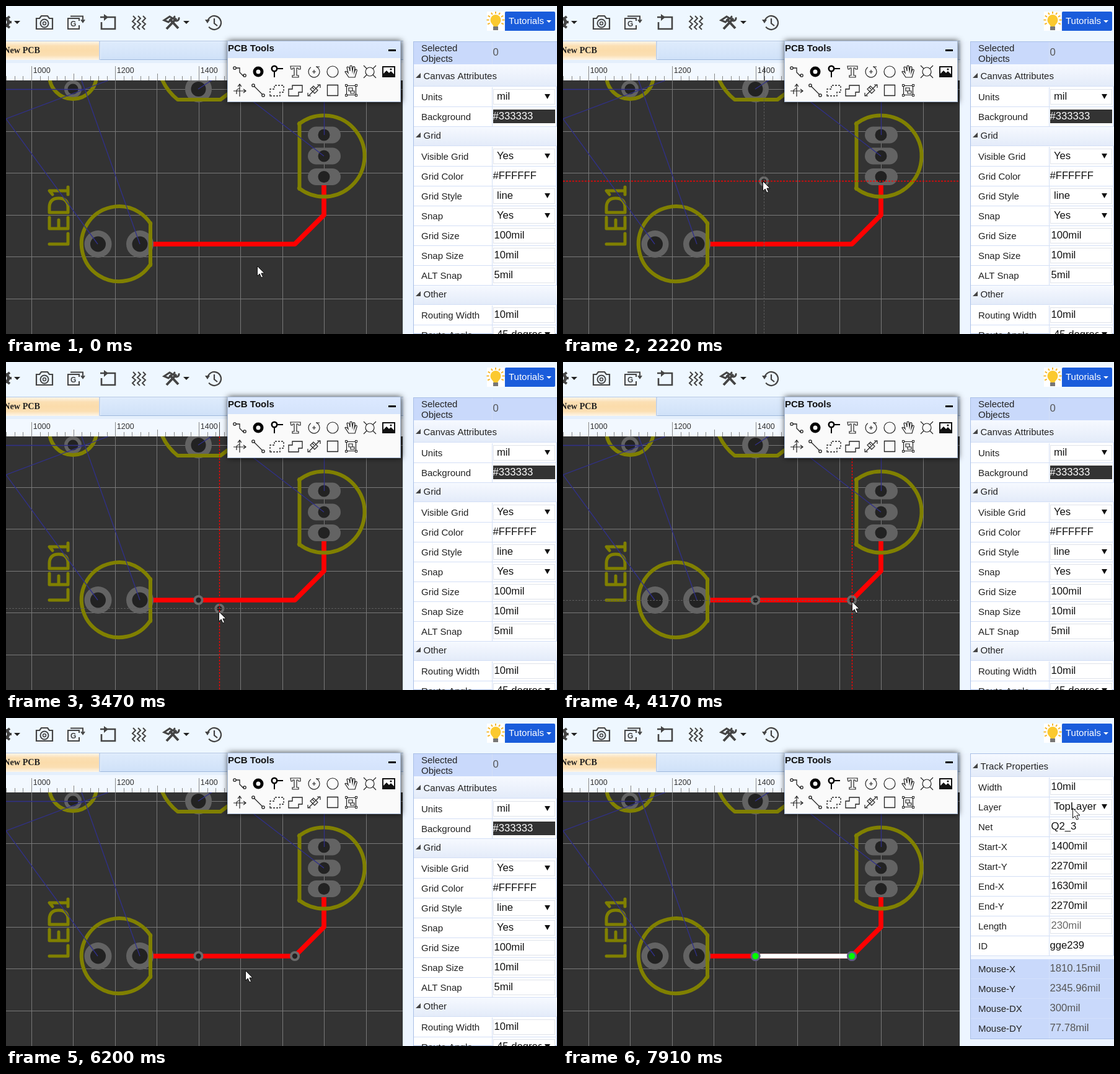
Recreate the animation shown at these times as an HTML page with a canvas. Size 889 px wide and 529 px high, loop 7.99 s.

```html
<!DOCTYPE html>
<html lang="en">
<head>
<meta charset="utf-8">
<title>PCB editor</title>
<style>
html, body { margin: 0; width: 100%; height: 100%; overflow: hidden; background: #eef7ff; }
canvas { display: block; }
</style>
</head>
<body>
<canvas id="stage" width="889" height="529"></canvas>
<script>
const ctx = document.getElementById('stage').getContext('2d');
const LOOP = 7990, SCALE = 0.676, STEP = 10 * SCALE;
const SANS = '"Liberation Sans", Arial, sans-serif';
const SERIF = '"Liberation Serif", "Times New Roman", serif';
const OLIVE = '#808000', PAD = '#636363', HOLE = '#222', INK = '#444';
const TRACK = 7.7, VALUE = 16.67;

// pointer keyframes: time, x, y
const KEYS = [
  [0, 405, 419], [821, 405, 419], [1050, 412, 340], [1290, 432, 170], [1530, 437, 100],
  [1987, 437, 100], [2218, 322, 282], [2450, 306, 350], [2680, 308, 384],
  [3151, 308, 384], [3467, 343, 402], [3740, 400, 394], [4020, 459, 386],
  [4050, 459, 386], [4170, 466, 386], [5555, 466, 386], [5810, 384, 452],
  [5962, 384, 452], [6195, 386, 407], [6350, 387, 384], [6982, 387, 384],
  [7137, 470, 372], [7293, 589.8, 331.4], [7527, 740, 230], [7760, 820, 150],
  [7909, 820, 150], [7910, 822, 145], [LOOP, 822, 145]
];
// stepped moves: start, end, number of steps
const MOVES = [[900, 1530, 9], [1910, 2680, 11], [3230, 4020, 11], [4110, 4170, 2],
  [5640, 5810, 3], [6040, 6350, 5], [7060, 7760, 10], [7910, 7911, 2]];
// click highlights: start, end, x, y
const CLICKS = [[520, 900, 405.5, 419.5], [1910, 1987, 437, 99.5], [3090, 3230, 308.5, 384.5],
  [4630, 5410, 466.5, 386.5], [6670, 7060, 387, 384]];

function pointer(t) {
  let held = 0;
  for (const [a, b, n] of MOVES) {
    if (t < a) break;
    const d = (b - a) / (n - 1);
    held = a + Math.min(n - 1, Math.floor((t - a) / d + 1e-6)) * d;
  }
  const i = Math.max(1, KEYS.findIndex(k => k[0] >= held));
  const [t0, x0, y0] = KEYS[i - 1], [t1, x1, y1] = KEYS[i];
  const f = (held - t0) / (t1 - t0);
  return { x: x0 + (x1 - x0) * f, y: y0 + (y1 - y0) * f };
}

function rect(x, y, w, h, fill, line) {
  if (fill) { ctx.fillStyle = fill; ctx.fillRect(x, y, w, h); }
  if (line) { ctx.strokeStyle = line; ctx.lineWidth = 1; ctx.strokeRect(x + .5, y + .5, w - 1, h - 1); }
}
function stroke(d, color, w = 1, dash = []) {
  ctx.strokeStyle = color;
  ctx.lineWidth = w;
  ctx.setLineDash(dash);
  ctx.stroke(new Path2D(d));
  ctx.setLineDash([]);
}
function fill(d, color) { ctx.fillStyle = color; ctx.fill(new Path2D(d)); }
function disc(x, y, r, color) {
  ctx.fillStyle = color;
  ctx.beginPath(); ctx.arc(x, y, r, 0, 7); ctx.fill();
}
function ring(x, y, r, color, w, a = 0, b = Math.PI * 2) {
  ctx.strokeStyle = color; ctx.lineWidth = w;
  ctx.beginPath(); ctx.arc(x, y, r, a, b); ctx.stroke();
}
function text(s, x, y, size, color = '#111', font = SANS, weight = '', align = 'left') {
  ctx.font = `${weight} ${size}px ${font}`;
  ctx.fillStyle = color;
  ctx.textAlign = align;
  ctx.fillText(s, x, y);
}
function shade(x, y, w, h, ...colors) {
  const g = ctx.createLinearGradient(0, y, 0, y + h);
  colors.forEach((c, i) => g.addColorStop(i / (colors.length - 1), c));
  rect(x, y, w, h, g);
}
function caret(x, y, color, r = 5) { fill(`M${x - r} ${y}h${2 * r}l${-r} ${r}z`, color); }

function toolbar() {
  rect(0, 0, 889, 529, '#eef7ff');
  ring(-2, 26, 6, INK, 5);
  stroke('M2 20l4-3M4 26h5M2 32l4 3', INK, 4);
  caret(18, 24, '#222');
  stroke('M49 20h5l3-4h10l3 4h5v17h-26z', INK, 2.2);
  ring(62, 28, 6.5, INK, 2);
  ring(62, 28, 2.5, INK, 1.5);
  stroke('M118 31v6h-18v-17h18v4M104 16.5h20v9M121 22l3 4 3-4', INK, 2);
  text('G', 104, 33, 12, INK, SANS, 'bold');
  stroke('M154 26v11h22v-19h-24', INK, 2.6);
  fill('M158 13l7 5-7 6z', INK);
  for (let i = 0; i < 3; i++)
    stroke(`M${205 + i * 8} 16l4 4-5 5 5 4-5 5 4 4`, INK, 2);
  stroke('M259 37l16-17M264 21l14 15', INK, 4);
  stroke('M255 23l9-6 5 3-7 6z', INK, 3);
  ring(275, 20, 4, INK, 3, -.4, 4.2);
  caret(291, 24, '#222');
  ring(336, 27, 11, INK, 2.2, -2.9, 2.5);
  stroke('M336 20v8l5 4', INK, 2.2);
  fill('M321 22h8l-4 6z', INK);

  rect(776, 9, 28, 31, '#fff');
  for (let i = 0; i < 9; i++) {
    const a = Math.PI * (.85 + i * .1625), c = Math.cos(a), s = Math.sin(a);
    stroke(`M${790 + c * 10.5} ${23 + s * 10.5}L${790 + c * 14.5} ${23 + s * 14}`, '#f5b82e', 2);
  }
  disc(790, 22.5, 8.5, '#fbc92f');
  fill('M783 27h14l-4 6h-6z', '#fbc92f');
  rect(786, 33, 8, 6, '#777');
  fill('M807 9h77q2 0 2 2v27q0 2-2 2h-79v-29q0-2 2-2z', '#1a5cdb');
  text('Tutorials', 811, 29, 15, '#fff');
  caret(876, 23, '#fff', 4);

  rect(0, 56, 641, 36, '#e4effc');
  shade(0, 57, 151, 30, '#fef6e8', '#fbdfb3', '#fbdcab', '#fbdfb3', '#fef6e8');
  rect(150, 57, 2, 30, '#c3d4ec');
  shade(153, 58, 488, 29, '#deebfc', '#cfe1f8');
  rect(0, 56, 641, 1, '#b4c8e4');
  rect(152, 86, 489, 1, '#9fb9dd');
  text('New PCB', 55, 76, 14.2, '#222', SERIF, 'bold', 'right');
}

function ruler(mark) {
  rect(0, 92, 641, 28, '#f2f8ff');
  for (let i = -3; i < 45; i++) {
    const x = Math.round(41 + i * 2 * STEP), major = i % 10 === 0;
    rect(x, major ? 97 : i % 5 === 0 ? 109 : 113, 1, 30, '#888');
    if (major && i >= 0) text(1000 + i * 20, x + 2.8, 108, 12.5, '#333');
  }
  if (mark) rect(Math.floor(mark), 97, 1, 23, '#444');
}

function via(x, y) {
  disc(x, y, 8, '#6a6a6a');
  disc(x, y, 4.2, HOLE);
}
function padRound(x, y, r, hole) {
  disc(x, y, r, PAD);
  disc(x, y, hole, HOLE);
}

function board(t, p) {
  const placing = t >= 1987 && t < 5410 && p.y > 120;
  const snap = (v, o) => o + Math.round((v - o) / STEP) * STEP;
  const vx = snap(p.x, 40.2), vy = snap(p.y - 1, 134);

  ruler(placing && vx);
  ctx.save();
  ctx.beginPath(); ctx.rect(0, 120, 640, 409); ctx.clip();
  rect(0, 120, 640, 409, '#333');
  for (let i = 0; i < 9; i++) {
    rect(Math.floor(41 + i * 67.55), 120, 1, 409, '#787878');
    if (i < 6) rect(0, Math.floor(134.5 + i * 67.55), 640, 1, '#787878');
  }

  ctx.lineCap = ctx.lineJoin = 'round';
  stroke('M513 276V337L466 384H216', '#f00', TRACK);
  if (t >= 6350) stroke('M311 384H465', '#fff', TRACK);

  padRound(148.5, 384, 22, 12.5);
  padRound(216, 384, 22, 12.5);
  padRound(108, 134, 14, 8.5);
  padRound(310.5, 134, 21.5, 12);
  for (const y of [208, 242, 275.5]) {
    stroke(`M500.5 ${y}H526.5`, PAD, 27);
    disc(513, y, 9.5, HOLE);
  }

  // component outlines lie above the pads
  ring(182.3, 383.7, 60.5, OLIVE, 6, .57, Math.PI * 2 - .57);
  stroke('M233 350V418', OLIVE, 6);
  ring(513, 242, 65.5, OLIVE, 6, -2.23, 2.23);
  stroke('M473.5 189V295', OLIVE, 6);
  ring(108, 112, 38, OLIVE, 6);
  stroke('M249 112Q258 136 277 151H346L362 139', OLIVE, 6);
  ctx.save();
  ctx.translate(103, 387);
  ctx.rotate(-Math.PI / 2);
  stroke('M3-33V-3H20M46-33H28V-3H46M28-18H42M54-33V-3H62Q77-3 77-18Q77-33 62-33ZM83-28L89-33V-3M83-3H95', OLIVE, 5);
  ctx.restore();

  ctx.lineCap = 'butt';
  stroke('M0 134.5H127M0 182L165 120M0 182L148 384M122 120L216 384M310 134L350 108M357 122L513 242M513.5 120V208', '#30308a', 1.3);

  if (t >= 3090) via(310.5, 384);
  if (t >= 4630) via(466, 384);
  if (placing) {
    via(vx, vy);
    const x = Math.floor(vx) + .5, y = Math.floor(vy) + .5;
    const flat = t < 3090;
    stroke(`M0 ${y}H640`, flat ? '#f00' : '#5c5c5c', flat ? 1.3 : 1, [3, 2]);
    stroke(`M${x} 120V529`, flat ? '#5c5c5c' : '#f00', flat ? 1 : 1.3, [3, 2]);
  }
  if (t >= 6670) for (const x of [310.5, 466]) {
    disc(x, 384, 8, '#5e5e84');
    disc(x, 384, 5.2, '#0f0');
  }
  ctx.restore();
  rect(640, 120, 1, 409, '#d5e2f2');
}

function palette(p) {
  ctx.save();
  ctx.shadowColor = 'rgba(0,0,0,.75)';
  ctx.shadowBlur = 9;
  ctx.shadowOffsetX = 1;
  rect(357, 56, 280, 99, '#fafafa');
  ctx.restore();
  shade(357, 57, 280, 28, '#dce9ff', '#d4e3fb');
  rect(357, 84, 280, 71, '#fafafa');
  rect(357, 56, 280, 99, null, '#a9bcd8');
  text('PCB Tools', 358, 73, 15, '#111', SANS, 'bold');
  rect(617, 70, 12, 3, '#000');

  if (Math.abs(p.x - 437) < 16 && p.y > 89 && p.y < 122) rect(422, 90, 30, 31, '#dfebff', '#a9c6f5');

  const k = '#222';
  stroke('M371 100h6v7l5 5h2', k, 1.3);
  ring(369, 100, 2.2, k, 1.3); ring(385, 112, 2.2, k, 1.3);
  ring(407, 106, 6, '#000', 5);
  ring(433, 101, 4.2, '#000', 2.6);
  stroke('M437 101h10M433 105v10', '#000', 2);
  stroke('M459 97h16v5h-3l-1-2h-2v12h3v3h-10v-3h3v-12h-2l-1 2h-2z', k, 1.2);
  ring(497, 106, 9, k, 1.2, -1.2, 4.1);
  stroke('M497 103v6M494 106h6M501 98h5', k, 1.2);
  ring(527, 106, 9, k, 1.2);
  stroke('M553 115l-6-9q2-2 5 2l-2-9q2-2 4 1l1 5v-8q2-2 3 0l1 8 1-7q2-1 3 1l-1 8 2-5q3 0 2 3l-3 10z', k, 1.2);
  ring(587, 106, 7, k, 1.2);
  stroke('M577 96l5 5M597 96l-5 5M577 116l5-5M597 116l-5-5', k, 1.2);
  rect(607, 97, 21, 18, '#111');
  rect(609, 99, 17, 14, '#fff');
  fill('M609 113v-4l5-5 4 4 3-3 5 5v3z', '#111');
  disc(621, 102, 1.6, '#111');

  stroke('M377 126v20M367 137h20M374 130l3-4 3 4M383 134l4 3-4 3M372 142v-5q0-3 5-4', k, 1.2);
  stroke('M400 129L414 143', k, 1.3);
  ring(399, 128, 2.2, k, 1.3); ring(415, 144, 2.2, k, 1.3);
  stroke('M426 145v-11h7v-6h15v11h-6v6z', k, 1.3, [3, 2]);
  stroke('M456 145v-11h6v-6h16v11h-6v6z', k, 1.3);
  stroke('M488 145L506 127M487 140v5h5M502 127h5v5M491 134l7 7 5-5-7-7zM494 131l3 3M498 141l-2-2', k, 1.2);
  stroke('M518.5 127.5h17v17h-17z', k, 1.3);
  stroke('M549.5 128.5h15v15h-15zM553 132h6v5h-6zM557 137h5v4h-6v-4', k, 1.2);
  for (const x of [547, 563]) for (const y of [126, 142]) rect(x, y, 4, 4, '#fafafa', k);
}

function label(s, b) {
  rect(658, b + 10, 231, 1, '#d3dff6');
  text(s, 670, b, 15, '#222');
}
function header(s, top, b) {
  shade(658, top, 231, b + 12 - top, '#f6f9ff', '#e3ebf9');
  rect(658, b + 11, 231, 1, '#d3dff6');
  text(s, 673.5, b, 15, '#222');
  fill(`M669 ${b - 10}v8h-8z`, '#444');
}
// kinds: s select, i input, p plain
function row(name, value, kind, b, color = '#111') {
  label(name, b);
  if (kind !== 'p') rect(786, b - 18, 100, 25, '#fff', '#dfe3ea');
  if (kind === 's') {
    ctx.save();
    ctx.beginPath(); ctx.rect(786, b - 18, 78, 25); ctx.clip();
    text(value, 792, b - 1, VALUE, color);
    ctx.restore();
    fill(`M869 ${b - 10}h9l-4.5 8z`, '#111');
  } else text(value, kind === 'i' ? 787.5 : 785.5, b - 1, VALUE, color);
}

function panel(t, p) {
  rect(641, 57, 248, 472, '#edf5ff');
  rect(657, 57, 232, 472, '#fff', '#a9bfe6');
  if (t < 6670) {
    rect(658, 58, 231, 36, '#c9d9fb');
    text('Selected', 670, 73, 15, '#222');
    text('Objects', 670, 90, 15, '#222');
    text('0', 785.5, 80, VALUE, '#555');
    header('Canvas Attributes', 94, 118);
    row('Units', 'mil', 's', 152);
    label('Background', 184);
    rect(786, 167, 100, 22, '#333');
    text('#333333', 785.5, 183, VALUE, '#fff');
    header('Grid', 195, 214);
    row('Visible Grid', 'Yes', 's', 248);
    row('Grid Color', '#FFFFFF', 'p', 280);
    row('Grid Style', 'line', 's', 312);
    row('Snap', 'Yes', 's', 344);
    row('Grid Size', '100mil', 'i', 376);
    row('Snap Size', '10mil', 'i', 408);
    row('ALT Snap', '5mil', 'i', 440);
    header('Other', 451, 470);
    row('Routing Width', '10mil', 'i', 504);
    row('Route Angle', '45 degree', 's', 536);
    for (const [y, h] of [[58, 36], [131, 64], [227, 224], [483, 46]]) rect(784, y, 1, h, '#d3dff6');
    return;
  }
  header('Track Properties', 58, 83);
  const props = ['Width,10mil', 'Layer,TopLayer', 'Net,Q2_3', 'Start-X,1400mil', 'Start-Y,2270mil',
    'End-X,1630mil', 'End-Y,2270mil', 'Length,230mil', 'ID,gge239'];
  props.forEach((s, i) => {
    const [name, value] = s.split(',');
    row(name, value, i === 1 ? 's' : i === 8 ? 'p' : 'i', 117 + i * 32, i === 7 ? '#666' : '#111');
  });
  rect(784, 96, 1, 288, '#d3dff6');
  rect(658, 384, 231, 5, '#f4f8ff');
  rect(658, 389, 231, 128, '#c9d9fb');
  rect(657, 517, 232, 1, '#a9bfe6');
  rect(657, 518, 232, 11, '#edf5ff');

  // coordinates freeze once the pointer leaves the board
  const moving = t >= 7060;
  const dx = t >= 7290 ? 300 : (p.x - 387) / SCALE;
  const dy = t >= 7290 ? 77.78 : (384 - p.y) / SCALE;
  const mil = v => +v.toFixed(2) + 'mil';
  [['X', 1510.15 + dx], ['Y', 2268.18 + dy], ['DX', moving ? dx : -118.51], ['DY', moving ? dy : -1.86]]
    .forEach(([axis, v], i) => {
      const b = 410 + i * 32;
      text('Mouse-' + axis, 670, b, 15, '#222');
      text(mil(v), 785.5, b - 1, VALUE, '#555');
      if (i) rect(658, b - 22, 231, 1, '#d3e0fb');
    });
  rect(784, 389, 1, 128, '#d3e0fb');
}

function arrow({ x, y }) {
  ctx.save();
  ctx.translate(Math.round(x) + .5, Math.round(y) + .5);
  ctx.lineJoin = 'miter';
  const d = 'M0 0V16L3.7 12.5L6.4 18.6L9 17.4L6.4 11.5H11.5Z';
  fill(d, '#fff');
  stroke(d, '#111', 1);
  ctx.restore();
}

function draw(t) {
  const p = pointer(t);
  toolbar();
  board(t, p);
  panel(t, p);
  palette(p);
  for (const [a, b, x, y] of CLICKS)
    if (t >= a && t < b) disc(x, y, 12, 'rgba(255,235,20,.64)');
  arrow(p);
}

const start = performance.now();
function frame() {
  draw((performance.now() - start) % LOOP);
  requestAnimationFrame(frame);
}
frame();
</script>
</body>
</html>
```
